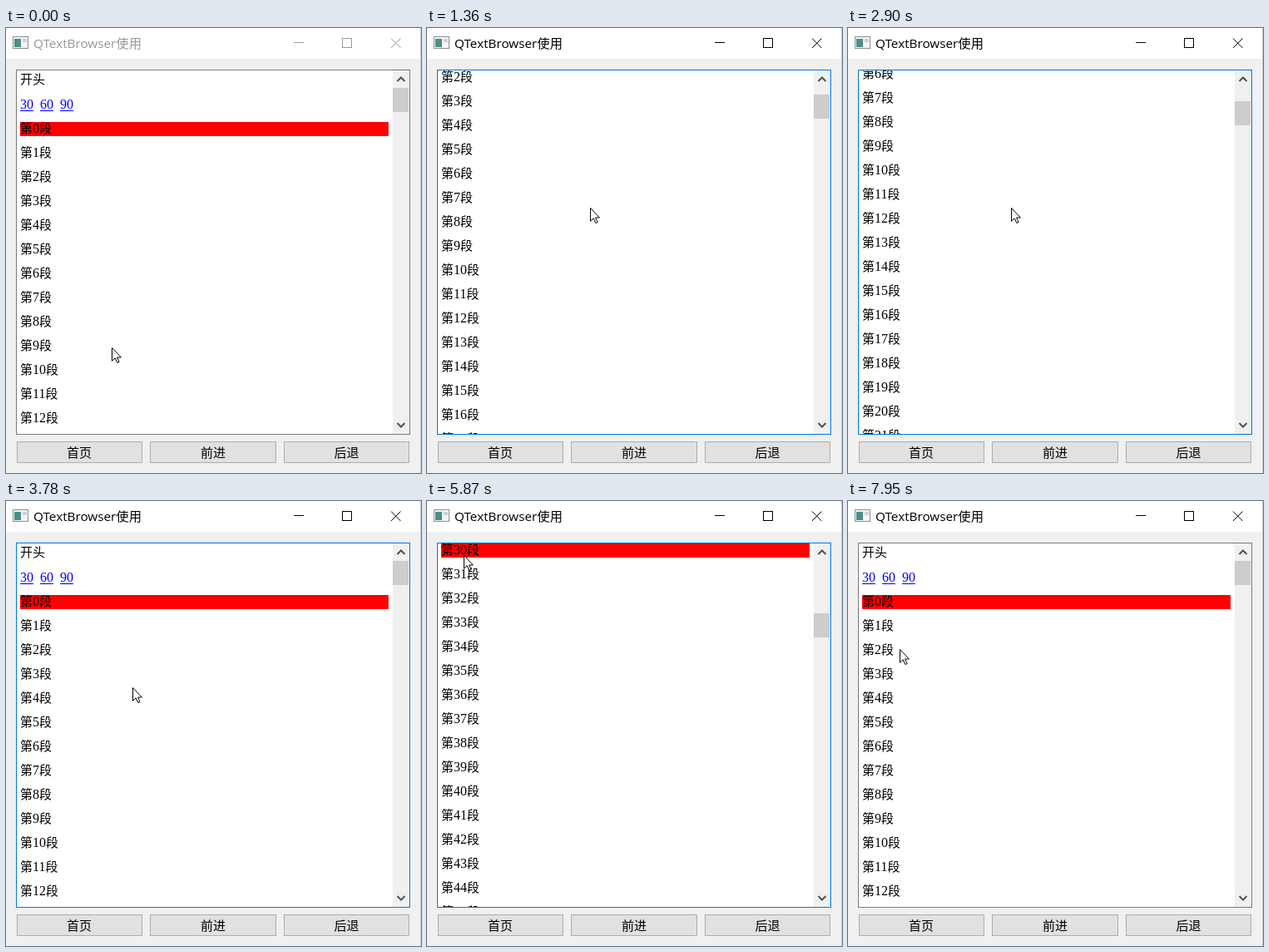
These frames come from a looping animation (499 px wide and 535 px high, 8 s). An HTML page:

```html
<!DOCTYPE html>
<html lang="zh">
<head>
<meta charset="utf-8">
<title>QTextBrowser使用</title>
<style>
@property --scroll { syntax: '<integer>'; inherits: true; initial-value: 0; }

html, body { margin: 0; width: 499px; height: 535px; overflow: hidden; background: #f0f0f0; }
svg { display: block; }
text { font: 300 15px 'Noto Sans CJK SC', 'Noto Sans CJK', sans-serif; white-space: pre; }
.num { font: 16px 'Liberation Serif', serif; }
.link { fill: #00f; }
.title { font: 15.3px 'Open Sans', 'Noto Sans CJK SC', 'Noto Sans CJK', sans-serif; }
.crisp { shape-rendering: crispEdges; }
.btn rect { fill: #e1e1e1; stroke: #adadad; }
.btn text { text-anchor: middle; }

.bar, .border, .view, .arrow, .hand, #home { animation: 8s step-end infinite; }
.bar { animation-name: activate; }
.border { animation-name: focus; }
.view { animation-name: scroll; }
#page { transform: translateY(calc(var(--scroll) * -1px)); }
#thumb { transform: translateY(calc(var(--scroll) * .0672px)); }
#cursor { animation: move 8s step-end infinite; }
.arrow { animation-name: arrow; }
.hand { animation-name: hand; }
#home { animation-name: press; }

@keyframes activate {
  0% { color: #999; }
  10.25%, 100% { color: #000; }
}
@keyframes focus {
  0%, 92.56%, 100% { stroke: #7a7a7a; }
  10.25% { stroke: #0078d7; }
}
@keyframes scroll {
  0%, 37%, 94%, 100% { --scroll: 0; }
  17% { --scroll: 120; }
  17.875% { --scroll: 180; }
  22% { --scroll: 240; }
  23% { --scroll: 360; }
  24% { --scroll: 420; }
  27.125% { --scroll: 540; }
  27.875% { --scroll: 600; }
  32.125% { --scroll: 480; }
  32.75% { --scroll: 360; }
  36.25% { --scroll: 240; }
  36.625% { --scroll: 120; }
  59.75% { --scroll: 932; }
}
@keyframes move {
  0% { transform: translate(127px, 384px); }
  .75% { transform: translate(129px, 385px); }
  3.75% { transform: translate(129px, 385px); animation-timing-function: steps(8, start); }
  10.25% { transform: translate(189px, 208px); }
  12.625% { transform: translate(189px, 208px); animation-timing-function: steps(3, start); }
  14.69% { transform: translate(196px, 216px); }
  47.25% { transform: translate(152px, 224px); }
  48.025% { transform: translate(152px, 224px); animation-timing-function: steps(7, start); }
  53.45% { transform: translate(19px, 99px); animation-timing-function: steps(3, start); }
  55.775% { transform: translate(24px, 89px); }
  67% { transform: translate(24px, 89px); animation-timing-function: steps(5, start); }
  70.99% { transform: translate(72px, 61px); animation-timing-function: steps(4, start); }
  74.175% { transform: translate(44px, 65px); }
  81.875% { transform: translate(44px, 65px); animation-timing-function: steps(8, start); }
  87.875% { transform: translate(121px, 491px); }
  89% { transform: translate(121px, 500px); }
  89.71% { transform: translate(121px, 500px); animation-timing-function: steps(3, start); }
  91.85% { transform: translate(110px, 512px); }
  96.25% { transform: translate(110px, 512px); animation-timing-function: steps(4, start); }
  99.1% { transform: translate(84px, 300px); }
  99.375%, 100% { transform: translate(62px, 178px); }
}
@keyframes arrow {
  0%, 59.75%, 100% { opacity: 1; }
  52.675% { opacity: 0; }
}
@keyframes hand {
  0%, 59.75%, 100% { opacity: 0; }
  52.675% { opacity: 1; }
}
@keyframes press {
  0%, 99.375%, 100% { fill: #e1e1e1; stroke: #adadad; }
  89.71% { fill: #e1e1e1; stroke: #adadad; animation-timing-function: linear; }
  91.85%, 94% { fill: #e5f1fb; stroke: #0078d7; }
  92.56% { fill: #cce4f7; stroke: #005499; }
}
</style>
</head>
<body>
<svg width="499" height="535" viewBox="0 0 499 535">
  <defs><clipPath id="clip"><rect x="13" y="51" width="452" height="437"/></clipPath></defs>

  <rect width="499" height="37" fill="#fff"/>
  <rect x="498" width="1" height="535" fill="#d0d0d0"/>
  <g class="crisp">
    <rect x="8.5" y="10.5" width="18" height="14" fill="#f4f4f4" stroke="#8b8f94"/>
    <rect x="10" y="13" width="8" height="10" fill="#4b8f86"/>
    <rect x="20" y="13" width="5" height="4" fill="#c9d3da"/>
  </g>
  <g class="bar">
    <text class="title" x="33" y="24" fill="currentColor">QTextBrowser使用</text>
    <g fill="none" stroke="currentColor">
      <path class="crisp" d="M346 17.5h12M404.5 12.5h11v11h-11z"/>
      <path d="M463 12.5l11.5 11.5M474.5 12.5L463 24"/>
    </g>
  </g>

  <g class="view">
    <rect x="13" y="51" width="472" height="437" fill="#fff"/>
    <g clip-path="url(#clip)">
      <g id="page">
        <text x="17" y="67">开头</text>
      </g>
    </g>
    <rect x="465" y="51" width="20" height="437" fill="#f0f0f0"/>
    <rect id="thumb" class="crisp" x="465" y="72" width="19" height="29" fill="#cdcdcd"/>
    <path d="M470.5 64l4.5-4.5 4.5 4.5M470.5 475l4.5 4.5 4.5-4.5" fill="none" stroke="#505050" stroke-width="2"/>
  </g>
  <rect class="border crisp" x="12.5" y="50.5" width="473" height="438" fill="none"/>

  <g class="btn">
    <rect id="home" class="crisp" x="13.5" y="497.5" width="150" height="25"/>
    <rect class="crisp" x="173.5" y="497.5" width="151" height="25"/>
    <rect class="crisp" x="334.5" y="497.5" width="150" height="25"/>
    <text x="88" y="516">首页</text>
    <text x="249" y="516">前进</text>
    <text x="409.5" y="516">后退</text>
  </g>

  <g id="cursor" fill="#fff" stroke="#000">
    <path class="arrow" d="M.5 .5V16.3L4.2 12.8 6.8 18.5 9.1 17.5 6.5 12H11.4Z"/>
    <path class="hand" d="M-1.5 13V2a1.5 1.5 0 0 1 3 0V7l8 1.5q1 .4 1 2V15l-2 4.5h-8L-5.5 13.5V11h2z"/>
  </g>
</svg>
<script>
const page = document.getElementById('page');

function add(tag, attrs, content = '') {
  const el = document.createElementNS('http://www.w3.org/2000/svg', tag);
  for (const name in attrs) el.setAttribute(name, attrs[name]);
  el.innerHTML = content;
  page.append(el);
}

// Links to the highlighted paragraphs
[30, 60, 90].forEach((n, i) => {
  const x = 17 + i * 24;
  add('text', { class: 'num link', x, y: 97 }, n);
  add('rect', { class: 'link', x, y: 99, width: 16, height: 1 });
});

for (let n = 0; n < 100; n++) {
  const top = 113 + n * 29;
  if (n % 30 === 0) add('rect', { x: 17, y: top, width: 443, height: 17, fill: '#f00' });
  add('text', { x: 17, y: top + 13 }, `第<tspan class="num">${n}</tspan>段`);
}
</script>
</body>
</html>
```
